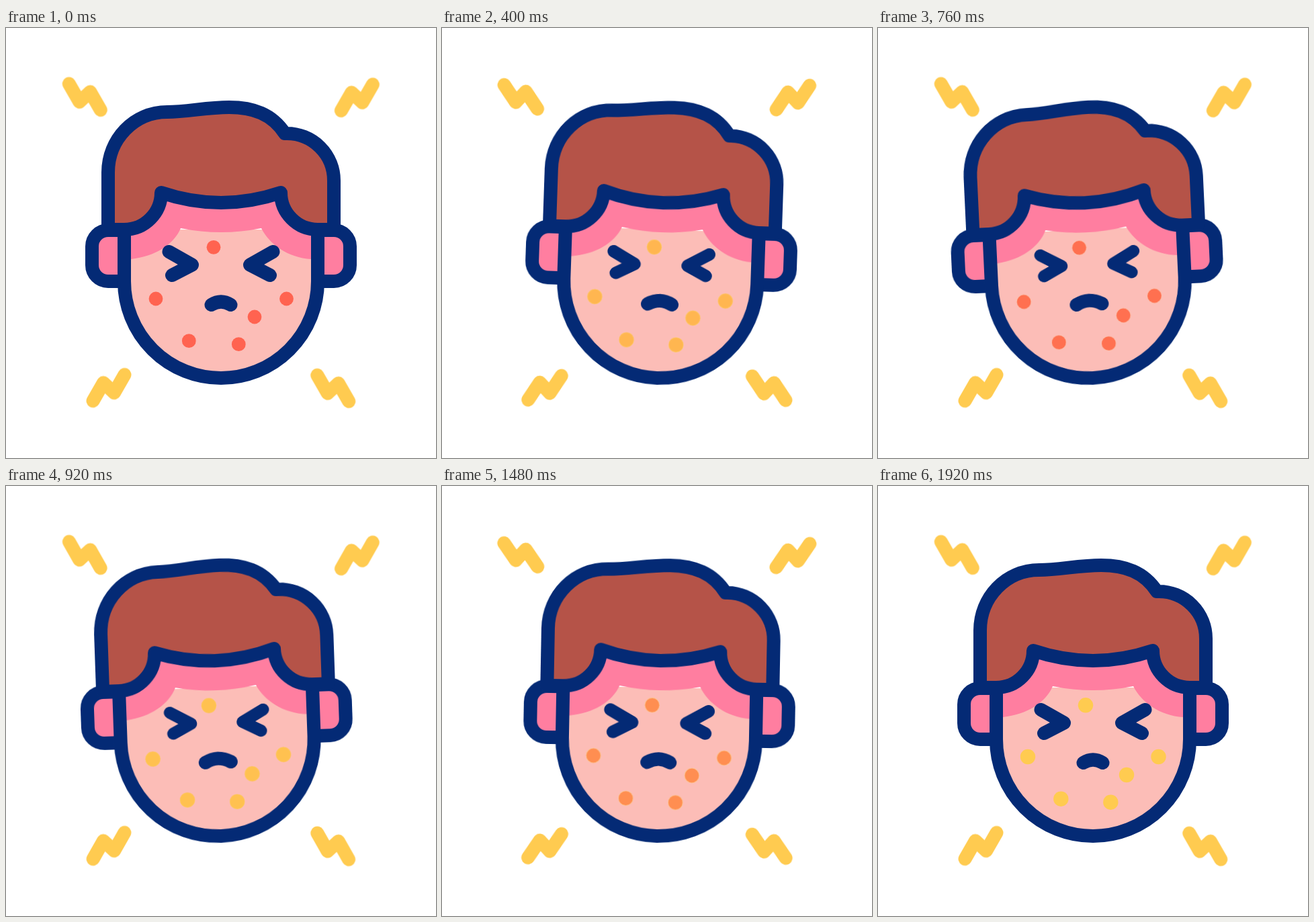
Animation of 640x640 px, one loop 2000 ms. Source, as an HTML page:

```html
<!DOCTYPE html>
<html lang="en">
<head>
<meta charset="utf-8">
<title>Sick face</title>
<style>
  html, body { margin: 0; width: 100%; height: 100%; overflow: hidden; background: #fff; }
  svg { display: block; width: 100%; height: 100%; }

  .line { fill: none; stroke: #042a75; stroke-width: 20; stroke-linecap: round; stroke-linejoin: round; }
  .skin { fill: #fcbdb7; }
  .pink { fill: #ff7ea0; }
  .hair { fill: #b55348; }
  .red { fill: #ff6350; }
  .yellow { fill: #ffcb50; }
  .bolt { fill: none; stroke: #ffcb50; stroke-width: 20; stroke-linecap: round; stroke-linejoin: round; }

  .head, .eyes, .mouth, .glow, .bolt {
    animation: 2s cubic-bezier(.33, 0, .67, 1) infinite;
  }
  .head { transform-origin: 320px 531px; animation-name: sway; }
  .eyes { transform-origin: 320px 352px; animation-name: squint; }
  .mouth { animation-name: frown; }
  .glow { animation-name: glow; }
  .bolt { transform-origin: 0 0; animation-name: shake; }

  @keyframes sway {
    0%, 4% { transform: rotate(0deg); }
    14% { transform: rotate(2.7deg); }
    40% { transform: rotate(-2.75deg); }
    66% { transform: rotate(2.75deg); }
    80%, 100% { transform: rotate(0deg); }
  }
  @keyframes squint {
    0%, 4% { transform: scale(1); }
    27%, 55.5% { transform: scale(.895); }
    96%, 100% { transform: scale(1); }
  }
  @keyframes frown {
    0%, 4% { d: path("M305.5 412Q320 403 334.5 412"); }
    27%, 55.5% { d: path("M301 411Q320 400 339 411"); }
    96%, 100% { d: path("M305.5 412Q320 403 334.5 412"); }
  }
  @keyframes glow {
    0%, 5% { opacity: 0; }
    26% { opacity: 1; }
    37% { opacity: .1; }
    47.5% { opacity: .95; }
    60% { opacity: .11; }
    96%, 100% { opacity: 1; }
  }
  @keyframes shake {
    0%, 4% { transform: rotate(0deg); }
    12% { transform: rotate(5deg); }
    22% { transform: rotate(-4.8deg); }
    34% { transform: rotate(4.5deg); }
    42% { transform: rotate(-4.5deg); }
    50% { transform: rotate(5deg); }
    58% { transform: rotate(-4deg); }
    66% { transform: rotate(5deg); }
    74% { transform: rotate(-4.5deg); }
    82% { transform: rotate(5deg); }
    90% { transform: rotate(.5deg); }
    96%, 100% { transform: rotate(0deg); }
  }
</style>
</head>
<body>
<svg viewBox="0 0 640 640">
  <defs>
    <path id="ear" d="M176 301H152a24 24 0 0 0-24 24v28a24 24 0 0 0 24 24h24"/>
    <path id="face" d="M176 300V377a144 144 0 0 0 288 0V300"/>
    <path id="eye" d="M242.5 333 277 352.5 247 368"/>
    <g id="spots">
      <circle cx="309" cy="326.3"/>
      <circle cx="223" cy="403"/>
      <circle cx="417.5" cy="403"/>
      <circle cx="370" cy="430"/>
      <circle cx="272.3" cy="465.7"/>
      <circle cx="346.3" cy="470.7"/>
    </g>
  </defs>
  <style>
    .red circle, circle { r: 10.4px; }
    .glow { --r: 11.2px; }
    #spots circle { r: var(--r, 10.4px); }
  </style>

  <g transform="translate(117.3 102.5)"><path class="bolt" d="M-23.5-19.5-8 7.5 8-7.5 23.5 19.5"/></g>
  <g transform="translate(522.4 103.5) scale(-1 1)"><path class="bolt" d="M-23.5-19.5-8 7.5 8-7.5 23.5 19.5"/></g>
  <g transform="translate(153 535.5) scale(-1 1)"><path class="bolt" d="M-23.5-19.5-8 7.5 8-7.5 23.5 19.5"/></g>
  <g transform="translate(486.7 536.2)"><path class="bolt" d="M-23.5-19.5-8 7.5 8-7.5 23.5 19.5"/></g>

  <g class="head">
    <g id="ears">
      <use href="#ear" class="line" style="fill:#ff7ea0"/>
      <use href="#ear" class="line" style="fill:#ff7ea0" transform="matrix(-1 0 0 1 640 0)"/>
    </g>
    <use href="#face" class="skin"/>
    <path class="pink" d="M176 344.5Q181 344.5 186 344C222 340 250 322 260 298Q320 310 380 298C392 322 420 342 454 344L464 344.5V240H176Z"/>
    <use href="#face" class="line"/>
    <path class="line" style="fill:#b55348" d="M152 300H176a55 55 0 0 0 55-55Q320 275 409 245a55 55 0 0 0 55 55H488V227a70 70 0 0 0-70-70L415 157C396 128 368 118 332 118C298 118 270 125 240 125C190 125 152 166 152 215Z"/>

    <use href="#spots" class="red"/>
    <use href="#spots" class="yellow glow"/>

    <g class="eyes">
      <use href="#eye" class="line"/>
      <use href="#eye" class="line" transform="matrix(-1 0 0 1 640 0)"/>
    </g>
    <path class="line mouth" d="M305.5 412Q320 403 334.5 412"/>
  </g>
</svg>
</body>
</html>
```
